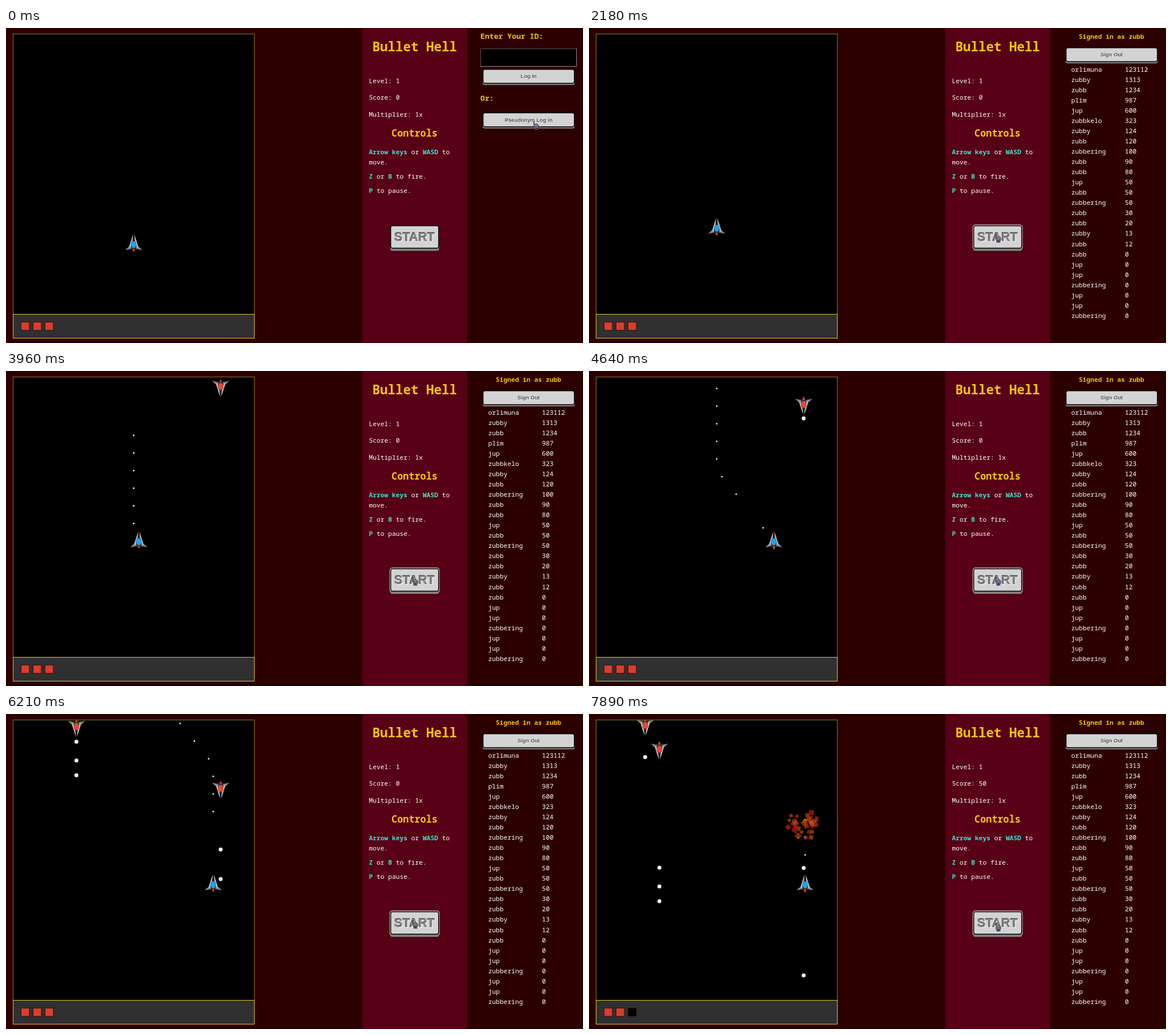
An HTML page with a canvas that plays this animation: 1012x554 px, repeating every 7.96 s.

```html
<!DOCTYPE html>
<html lang="en">
<head>
<meta charset="utf-8">
<title>Bullet Hell</title>
<style>
  html, body { margin: 0; width: 100%; height: 100%; overflow: hidden; background: #2d0000; }
  svg, canvas { position: absolute; left: 0; top: 0; }
  text { font: 11.25px "Noto Sans Mono", monospace; fill: #fff; white-space: pre; }
  .gold { fill: #f5c211; font-weight: 600; }
  .h1 { font-size: 22.5px; }
  .h2 { font-size: 16.87px; }
  .h3 { font-size: 13.16px; }
  .mid { text-anchor: middle; }
  .key { fill: #40e0d0; font-weight: 600; }
  .label { font: bold 9.375px "Liberation Sans", Arial, sans-serif; text-anchor: middle; }
  .big { font-size: 21.8px; }
</style>
</head>
<body>
<svg id="ui" width="1012" height="554"></svg>
<canvas id="field" width="1012" height="554"></canvas>
<svg id="pointer" width="1012" height="554">
  <g id="cursor">
    <path d="M-4-10v6" stroke="#333" stroke-width="1.6"/>
    <circle r="4.3" cy="-1" fill="#8d88a8" stroke="#2a2838"/>
    <path d="M-3 2h6v3h-6z" fill="#777390" stroke="#2a2838" stroke-width=".8"/>
    <path d="M-2.4-1h1.6M.8-1h1.6M0 1v3" stroke="#1c1a2c" stroke-width="1.5"/>
  </g>
</svg>
<script>
const LOOP = 7960, SIGN_IN = 450, START_CLICK = 1800;
const SHOT_SPEED = 0.1667, ENEMY_SHOT_SPEED = 0.133, SHIP_SPEED = 0.134;
const HIT = 6665, KILL = 7560, END = 7860;
const $ = id => document.getElementById(id);
const clamp = (v, lo, hi) => Math.max(lo, Math.min(hi, v));

// ---------- interface ----------
const text = (x, y, s, cls = '', id = '') => `<text x="${x}" y="${y}" class="${cls}" id="${id}">${s}</text>`;
const rect = (x, y, w, h, attrs) => `<rect x="${x}" y="${y}" width="${w}" height="${h}" ${attrs}/>`;
const key = s => `<tspan class="key">${s}</tspan>`;

function button(x, y, w, h, label, size = '') {
  const drop = size ? 4 : 2.3, cx = x + w / 2, base = y + h / 2 + (size ? 7 : 3.2), d = size ? 1 : 0.7;
  const layer = (o, fill) =>
    `<text x="${cx + o}" y="${base + o}" class="label ${size}" style="fill:${fill}" aria-hidden="${o !== 0}">${label}</text>`;
  return rect(x, y + drop, w, h, 'rx="3.5" fill="#808080"') +
    rect(x + .7, y + .7, w - 1.4, h - 1.4, 'rx="3.5" fill="#d3d3d3" stroke="#000" stroke-width="1.5"') +
    layer(d, '#fff') + (size ? layer(-.7, '#444') : '') + layer(0, size ? '#858585' : '#505050');
}

const board = `orlimuna 123112,zubby 1313,zubb 1234,plim 987,jup 600,zubbkelo 323,zubby 124,zubb 120,
zubbering 100,zubb 90,zubb 80,jup 50,zubb 50,zubbering 50,zubb 30,zubb 20,zubby 13,zubb 12,zubb 0,
jup 0,jup 0,zubbering 0,jup 0,jup 0,zubbering 0`.split(',').map(row => row.trim().split(' '));

$('ui').innerHTML =
  rect(0, 0, 1012, 554, 'fill="#2d0000"') +
  rect(625, 0, 183.5, 554, 'fill="#570016"') +
  rect(12.5, 10.5, 423, 493, 'fill="#000" stroke="#927a18"') +
  rect(12.5, 503.5, 423, 42, 'fill="#303030" stroke="#dcc832"') +
  [26.5, 47.5, 68.5].map((x, i) =>
    rect(x, 517.2, 14.5, 14.5, `id="life${i}" fill="#dc3c2c" stroke="#2a1210"`)).join('') +
  text(716.7, 41, 'Bullet Hell', 'gold h1 mid') +
  text(636.4, 97, 'Level: 1') +
  text(636.4, 126, 'Score: 0', '', 'score') +
  text(636.4, 156, 'Multiplier: 1x') +
  text(716.5, 191, 'Controls', 'gold h2 mid') +
  text(636.4, 222, `${key('Arrow keys')} or ${key('WASD')} to`) +
  text(636.4, 240, 'move.') +
  text(636.4, 265, `${key('Z')} or ${key('B')} to fire.`) +
  text(636.4, 290, `${key('P')} to pause.`) +
  rect(673.5, 346.3, 86.5, 43.7, 'id="focus" rx="4.5" fill="#808080" stroke="#ccc" stroke-width="1.2"') +
  button(674, 347, 85.5, 41, 'START', 'big') +
  `<g id="login">` +
    text(832, 18.5, 'Enter Your ID:', 'gold h3') +
    rect(832, 36, 169, 32, 'fill="#000"') +
    `<path d="M832.5 68V36.5H1001" fill="none" stroke="#5c5050"/>
     <path d="M832 67.5H1000.5V36" fill="none" stroke="#969090"/>` +
    button(836, 72, 161.5, 26, 'Log In') +
    text(832, 128, 'Or:', 'gold h3') +
    button(836, 148.5, 161.5, 26, 'Pseudonym Log in') +
  `</g><g id="signed">` +
    text(916.5, 18.7, 'Signed in as zubb', 'gold mid') +
    button(836, 34, 161.5, 26, 'Sign Out') +
    board.map(([name, score], i) =>
      text(845.8, 77 + i * 18.03, name) + text(940, 77 + i * 18.03, score)).join('') +
  `</g>`;

// ---------- game ----------
const ctx = $('field').getContext('2d');

const shipX = g => 224 + clamp((g - 3894) * SHIP_SPEED, 0, 139.5) + clamp((g - 6540) * SHIP_SPEED, 0, 15.5);
const shipY = g => 380 - clamp((g - 1966) * SHIP_SPEED, 0, 80.5);

// Bursts of player fire: first shot, count
const shots = [[2846, 8], [4502, 6], [6996, 4]].flatMap(([first, n]) =>
  Array.from({ length: n }, (_, i) => first + i * 186));

// Enemies: column, height when the loop ends, speed, shot heights when the loop ends
const enemies = [
  { x: 376.5, y: 208.6, v: .0463, shots: [511.5, 459.5, 270.5], dies: KILL },
  { x: 123.5, y: 62.8, v: .024, shots: [270, 303, 329], dies: Infinity },
  { x: 98.5, y: 21, v: .0245, shots: [75.5], dies: Infinity }
];

let seed = 11;
const random = () => (seed = seed * 16807 % 2147483647) / 2147483647;
const sparks = Array.from({ length: 34 }, () => ({
  angle: random() * 6.283, speed: .088 * Math.sqrt(random()), size: 4 + random() * 5,
  turn: random() * 3, color: `hsla(${random() * 26}, 85%, ${36 + random() * 12}%, .68)`
}));

function poly(fill, ...p) {
  ctx.beginPath();
  for (let i = 0; i < p.length; i += 2) ctx.lineTo(p[i], p[i + 1]);
  ctx.fillStyle = fill;
  ctx.fill();
}

function dot(x, y, r, fill) {
  ctx.beginPath();
  ctx.arc(x, y, r, 0, 7);
  ctx.fillStyle = fill;
  ctx.fill();
}

function craft(x, y, flip, glow, g) {
  ctx.save();
  ctx.translate(x, y);
  ctx.scale(1, flip);
  poly('#e2452f', -2.7, 8.5, 2.7, 8.5, .5 * Math.sin(g / 60), 14.3 + 1.5 * Math.sin(g / 43));
  for (const side of [-1, 1]) {
    ctx.save();
    ctx.scale(side, 1);
    poly('#999', 15, 10.5, 6.5, 3, 3, 6.5, 5.5, 8.5);
    poly('#555', 15, 10.5, 5, 7, 3, 9);
    poly('#bcbcbc', .8, -17, 3.2, -11, 8, 4.5, 5, 7, 2.2, -5);
    poly('#6c6c6c', .8, -17, 2.8, -5, 1.3, -6);
    ctx.restore();
  }
  poly('#333', -4, -4, 4, -4, 5, 6, 2, 9, -2, 9, -5, 6);
  ctx.beginPath();
  ctx.ellipse(0, .8, 4.3, 6.2, 0, 0, 7);
  ctx.fillStyle = glow;
  ctx.fill();
  ctx.restore();
}

function drawGame(g) {
  ctx.clearRect(0, 0, 1012, 554);
  ctx.save();
  ctx.beginPath();
  ctx.rect(13, 11, 422, 492);
  ctx.clip();

  shots.forEach(born => {
    if (g < born || (born === 6996 && g > KILL)) return;
    dot(shipX(born), 299 - (g - born) * SHOT_SPEED, 1.4, '#fff');
  });
  for (const e of enemies) {
    const y = e.y + (g - END) * e.v;
    for (const end of e.shots) {
      const sy = end + (g - END) * ENEMY_SHOT_SPEED;
      if (sy > y) dot(e.x, sy, 3.5, '#eee');
    }
    if (g < e.dies) craft(e.x, y, -1, '#ee4636', g);
  }
  craft(shipX(g), shipY(g), 1, '#18a4f2', g);

  const age = g - KILL;
  if (age >= 0) for (const s of sparks) {
    ctx.save();
    ctx.translate(375.5 + Math.cos(s.angle) * s.speed * age, 195 + Math.sin(s.angle) * s.speed * age);
    ctx.rotate(s.turn + age * .003);
    ctx.fillStyle = s.color;
    ctx.fillRect(-s.size / 2, -s.size / 2, s.size, s.size);
    ctx.restore();
  }
  ctx.restore();
}

function frame(now) {
  const t = now % LOOP;
  // The game runs slightly slow for a while
  const g = t - .02 * clamp(t - 5450, 0, 1500);
  drawGame(g);

  const show = (id, on) => $(id).setAttribute('visibility', on ? 'visible' : 'hidden');
  show('login', t < SIGN_IN);
  show('signed', t >= SIGN_IN);
  show('focus', t >= START_CLICK);
  $('life2').setAttribute('fill', g < HIT ? '#dc3c2c' : '#000');
  $('score').textContent = `Score: ${g < KILL ? 0 : 50}`;

  const p = clamp((t - 650) / 750, 0, 1), k = p * p * (3 - 2 * p);
  const x = 930 - 209 * k - 3 * clamp((t - 1500) / 250, 0, 1);
  const y = 174 + 197 * k + clamp((t - 1500) / 250, 0, 1) + 5 * clamp((t - 7600) / 200, 0, 1);
  $('cursor').setAttribute('transform', `translate(${x} ${y})`);
  requestAnimationFrame(frame);
}
requestAnimationFrame(frame);
</script>
</body>
</html>
```
